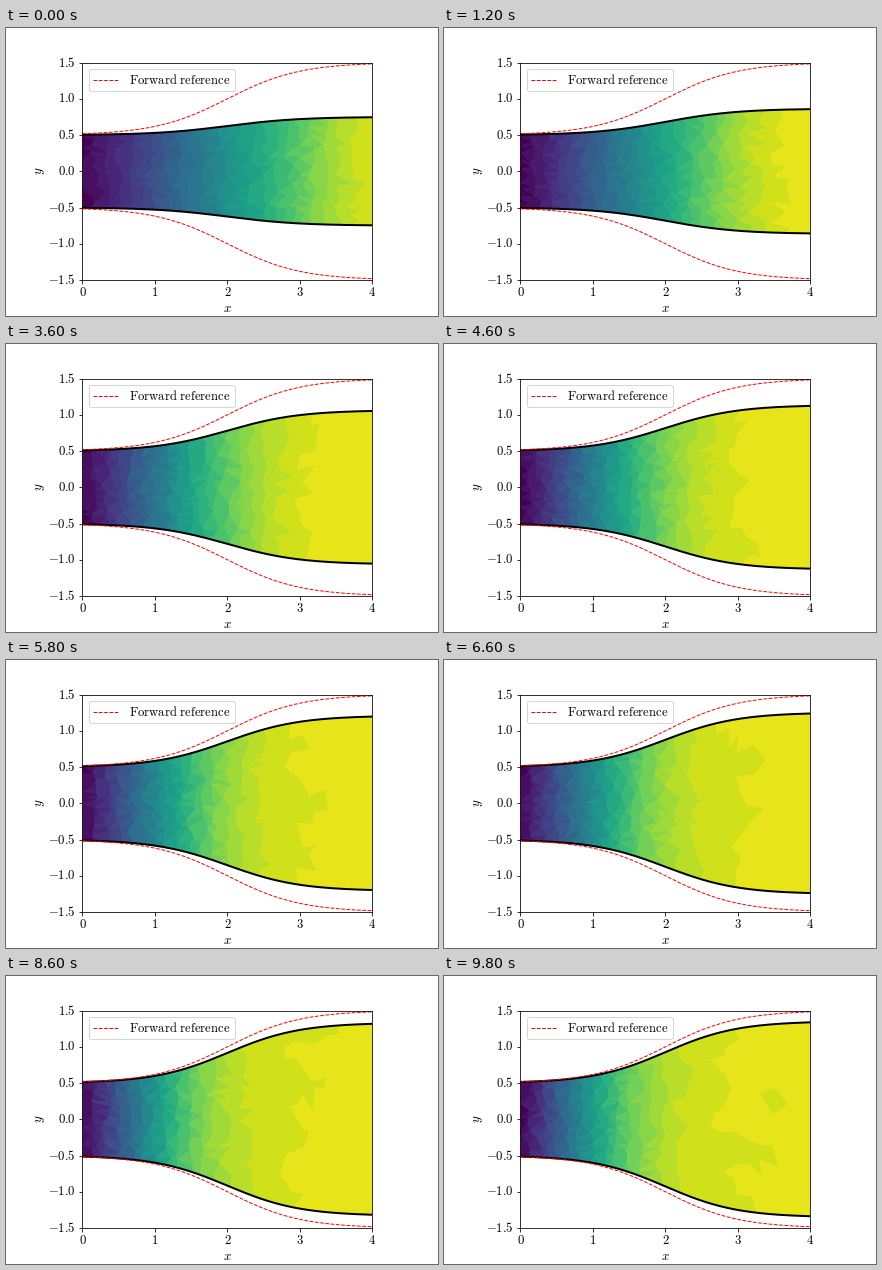
Write a matplotlib script that moves like this. It is 432 px wide and 288 px high and loops after 10000 ms.

```python
import matplotlib.pyplot as plt
import numpy as np
from matplotlib.animation import FuncAnimation
from matplotlib.path import Path
from matplotlib.tri import Triangulation

W, H, DPI = 432, 288, 72
FRAMES, STEP = 50, 200
SHADES = 28
SIZE = 12.7

plt.rcParams["mathtext.fontset"] = "cm"
xs = np.linspace(0, 4, 201)


def wall(x, amp):
    return 0.5 + amp / (1 + np.exp(-2 * (x - 2)))


def progress(i):
    """Ease-out from the narrowest to the widest channel."""
    return 1 - (1 - i / (FRAMES - 1)) ** 1.6


def mesh(rng, amp, nx=25, ny=12):
    """Jittered triangles filling the channel, slightly past its walls."""
    x, s = np.meshgrid(np.linspace(0, 4, nx), np.linspace(-1.04, 1.04, ny))
    dx, ds = 4 / (nx - 1), 2.08 / (ny - 1)
    x[:, 1:-1] += rng.uniform(-0.4, 0.4, (ny, nx - 2)) * dx
    s[1:-1] += rng.uniform(-0.35, 0.35, (ny - 2, nx)) * ds
    return Triangulation(x.ravel(), (s * wall(x, amp)).ravel())


def field(rng, x, y, m):
    """Linear rise that bends into a plateau, with a slight ripple."""
    rise = (0.25 + 0.22 * m + 0.08 * m * m) * x
    cap = 1 - 0.04 * m
    n = 5 + 7 * (1 - m) ** 2
    v = rise / (1 + (rise / cap) ** n) ** (1 / n)
    a, b = rng.uniform(0, 2 * np.pi, 2)
    v += 0.01 * np.sin(2.5 * x + 3 * y + a) * np.sin(5 * y - x + b)
    return np.round(np.clip(v, 0, 1) * SHADES) / SHADES


fig = plt.figure(figsize=(W / DPI, H / DPI), dpi=DPI, facecolor="white")
ax = fig.add_axes([76.44 / W, 36 / H, 289.92 / W, 217.44 / H])
ax.set_xlim(0, 4)
ax.set_ylim(-1.5, 1.5)

xticks = range(5)
yticks = np.arange(-1.5, 1.6, 0.5)
ax.set_xticks(xticks, [f"${t}$" for t in xticks], fontsize=SIZE)
ax.set_yticks(yticks, [f"${t:.1f}$" for t in yticks], fontsize=SIZE,
              va="center")
ax.tick_params(axis="x", pad=2.5)
fig.text(221.4 / W, 4.5 / H, "$x$", fontsize=13, ha="center", va="baseline")
fig.text(36.3 / W, 145.5 / H, "$y$", fontsize=13, ha="center", va="baseline",
         rotation=90, rotation_mode="anchor")

edges = [ax.plot([], [], "k-", lw=2)[0] for _ in range(2)]
for sign in (1, -1):
    goal, = ax.plot(xs, sign * wall(xs, 1), "r--", lw=1, zorder=2.2)

ax.legend([goal], [r"$\mathrm{Forward\ reference}$"], loc="upper left",
          fontsize=SIZE, borderpad=0.33, handletextpad=0.87)


def draw(i):
    for old in list(ax.collections):
        old.remove()
    rng = np.random.default_rng(100 + i)
    m = progress(i)
    amp = 0.25 + 0.603 * m
    top = wall(xs, amp)

    tri = mesh(rng, amp)
    cx = tri.x[tri.triangles].mean(axis=1)
    cy = tri.y[tri.triangles].mean(axis=1)
    cells = ax.tripcolor(tri, facecolors=field(rng, cx, cy, m),
                         cmap="viridis", vmin=0, vmax=1, zorder=1)
    outline = np.column_stack([np.r_[xs, xs[::-1]], np.r_[top, -top[::-1]]])
    cells.set_clip_path(Path(outline), ax.transData)

    edges[0].set_data(xs, top)
    edges[1].set_data(xs, -top)
    return edges


anim = FuncAnimation(fig, draw, frames=FRAMES, interval=STEP, repeat=True,
                     repeat_delay=0, blit=False)
plt.show()
```
